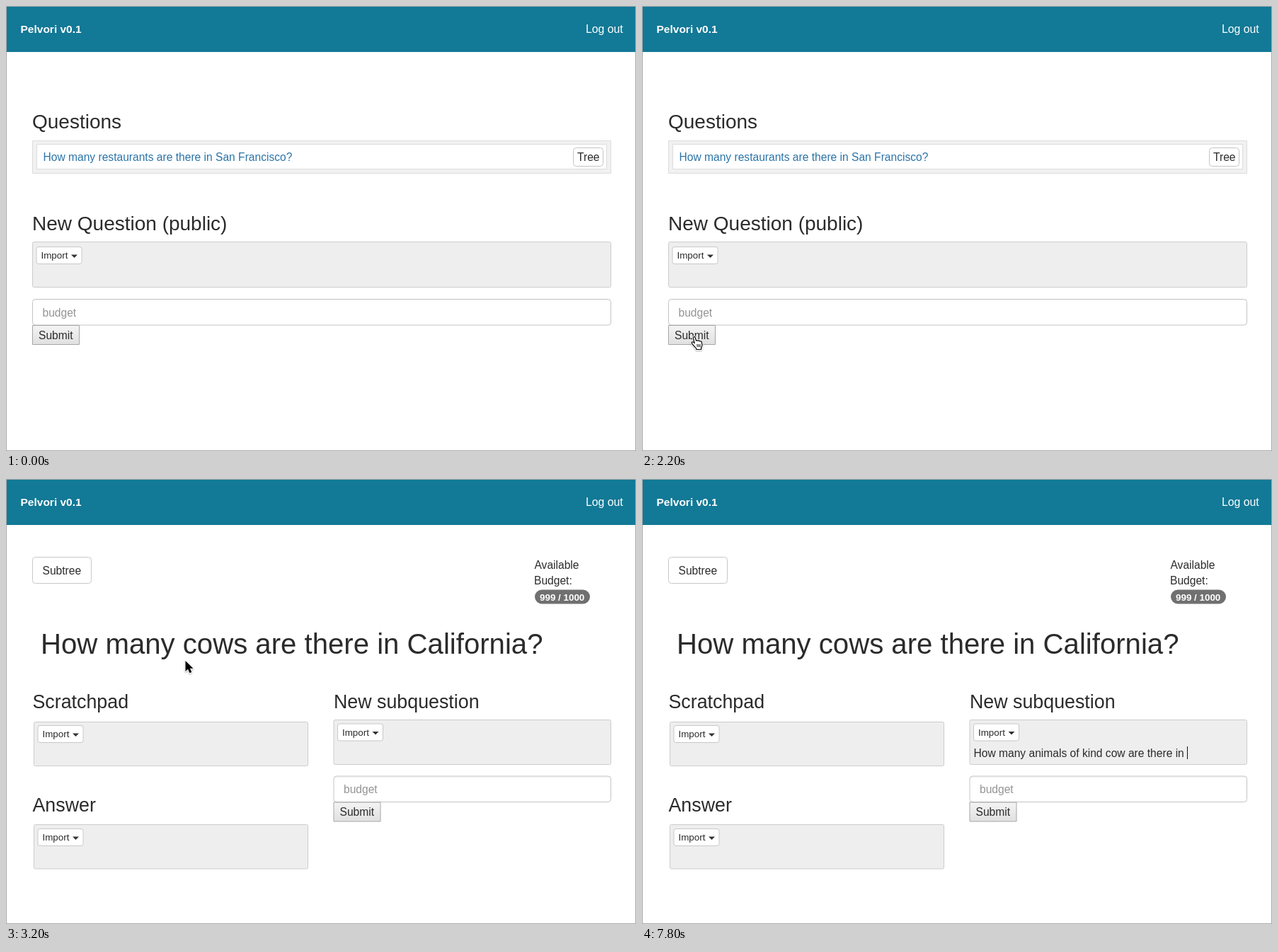
These frames come from a looping animation (890x629 px, 8000 ms). An HTML page with a canvas:

```html
<!DOCTYPE html>
<html lang="en">
<head>
<meta charset="utf-8">
<title>Question board</title>
<style>
html, body { margin: 0; width: 100%; height: 100%; overflow: hidden; background: #fff; }
canvas { display: block; width: 890px; height: 629px; }
</style>
</head>
<body>
<canvas id="stage" width="890" height="629"></canvas>
<script>
const ctx = document.getElementById('stage').getContext('2d');
const LOOP = 8000, TICK = 200;
const SANS = '"Liberation Sans", Arial, sans-serif';
const BODY = 15.6, INK = '#2b2b2b', LINK = '#2a74a8', HOVER = '#0d4858';
const COWS = 'How many cows are there in California?';
const SUBQUESTION = 'How many animals of kind cow are there in ';

// [start time, number of characters typed]
const firstTyping = [[0, 0], [200, 6], [400, 13], [600, 19], [800, 25], [1000, 32], [1200, 38], [2200, 0]];
const secondTyping = [[0, 0], [5400, 3], [5600, 6], [5800, 9], [6200, 11], [6400, 14], [6600, 16],
  [7200, 22], [7400, 29], [7600, 35], [7800, 42]];

// [start time, pointer shape, x, y]
const pointerKeys = [[0], [1600, 'beam', 196, 424], [1800, 'beam', 112, 438], [2000, 'hand', 74, 463],
  [2200, 'hand', 70, 467], [2400, 'beam', 77, 474], [2600, 'arrow', 246, 290], [3000, 'hand', 250, 257],
  [3200, 'arrow', 253.5, 257], [3400, 'arrow', 272, 270], [3600, 'arrow', 350, 311],
  [3800, 'arrow', 440, 362], [4000, 'beam', 492.5, 389], [4200, 'arrow', 625, 611], [5200]];

const latest = (keys, t) => keys.filter(key => key[0] <= t).pop();

function text(str, x, y, size = BODY, color = INK, weight = 400, family = SANS) {
  ctx.font = `${weight} ${size}px ${family}`;
  ctx.fillStyle = color;
  ctx.fillText(str, x, y);
}

function box(x, y, w, h, fill, stroke, radius = 0) {
  ctx.beginPath();
  ctx.roundRect(x, y, w, h, radius);
  ctx.fillStyle = fill;
  ctx.fill();
  if (!stroke) return;
  ctx.strokeStyle = stroke;
  ctx.lineWidth = 1;
  ctx.stroke();
}

function header() {
  box(0, 0, 890, 65, '#127996');
  text('Pelvori v0.1', 20.5, 37.5, 15.5, '#fff', 700);
  text('Log out', 819, 37.5, 15.8, '#fff');
}

function importButton(x, y) {
  box(x, y, 64, 24, '#fff', '#c8c8c8', 3);
  text('Import', x + 6.5, y + 16.5, 13.4);
  ctx.fillStyle = '#333';
  ctx.beginPath();
  ctx.moveTo(x + 49, y + 11);
  ctx.lineTo(x + 58, y + 11);
  ctx.lineTo(x + 53.5, y + 15.5);
  ctx.fill();
}

function editor(x, y, w, h, buttonGap) {
  box(x, y, w, h, '#eee', '#ccc', 2);
  importButton(x + 5.5, y + buttonGap);
}

function budgetForm(x, y, w) {
  box(x, y, w, 36.5, '#fff', '#c4c4c4', 4);
  box(x + 2, y + 1, w - 4, 1, 'rgba(0,0,0,.06)');
  text('budget', x + 14, y + 24, BODY, '#949494');
  const shade = ctx.createLinearGradient(0, y + 37, 0, y + 64);
  shade.addColorStop(0, '#f4f4f4');
  shade.addColorStop(1, '#e0e0e0');
  box(x, y + 37, 66, 27, shade, '#a6a6a6');
  text('Submit', x + 8.5, y + 56);
}

function typed(str, count, x, y, showCaret) {
  const part = str.slice(0, count);
  text(part, x, y);
  if (showCaret) box(Math.round(x + ctx.measureText(part).width), y - 14.5, 1, 18, '#111');
}

function questionRow(str, y, buttonY, color) {
  box(43.5, y, 805, 35, '#fff', '#ddd');
  text(str, 52.5, y + 23.5, BODY, color);
  box(801.5, buttonY, 42, 26, '#fff', '#c4c4c4', 4);
  text('Tree', 807, buttonY + 18.5);
}

function statusBar() {
  box(-1, 616.5, 297, 20, '#e9e9e9', '#a8a8a8', [0, 4, 0, 0]);
  text('trialhost:4100/.../bc07e29f-6da1-48b5-c937-2', 2, 631, 12.6, '#222', 400, 'Inter, sans-serif');
}

function listPage(t) {
  const added = t >= 2400, hovering = t >= 3000;
  const shift = added ? 39 : 0, gap = added ? 40 : 0;
  text('Questions', 37, 173, 28);
  box(37.5, 190.5, 817, 46 + gap, '#f1f1f1', '#ddd');
  questionRow('How many restaurants are there in San Francisco?', 195.5, 200.5, LINK);
  if (added) questionRow(COWS, 235.5, 239.5, hovering ? HOVER : LINK);
  text('New Question (public)', 37, 316.5 + gap, 28);
  editor(37.5, 333.5 + gap, 817, 64 - (gap - shift), added ? 6 : 7);
  if (t >= 200) typed(COWS, latest(firstTyping, t)[1], 43, 387 + shift, t < 2200);
  budgetForm(37.5, 414.5 + shift, 817);
  if (hovering) statusBar();
}

function questionPage(t) {
  box(37.5, 110.5, 83, 37, '#fff', '#c8c8c8', 4);
  text('Subtree', 51.5, 134.5);
  text('Available', 746.5, 126.5);
  text('Budget:', 746, 148.5);
  box(747, 156.5, 78, 20, '#707070', null, 10);
  text('999 / 1000', 754, 171.5, 13.4, '#fff', 700);
  text(COWS, 49, 247, 40.15);

  text('Scratchpad', 37.5, 323.5, 26.8);
  editor(39.5, 343.5, 387, 62, 5);
  text('Answer', 37.5, 469.5, 26.8);
  editor(39.5, 488.5, 387, 62.5, 6);

  text('New subquestion', 463, 323.5, 26.8);
  editor(463, 340.5, 391.5, 63, 5.5);
  const caretOn = t >= 5200 && (t < 6600 || t >= 7200);
  typed(SUBQUESTION, latest(secondTyping, t)[1], 468.5, 392.5, caretOn);
  budgetForm(463, 420, 391.5);
}

const shapes = {
  arrow: new Path2D('M0 0V15L3.5 11.8L6 17.3L8.8 16.1L6.4 10.8H11Z'),
  hand: new Path2D('M2.2 2Q3.3 -.6 5 1.2L6.6 6.2Q8 4.8 9 6.3Q10.6 5.2 11.6 7Q13.6 6.2 14.3 8.2L15 12' +
    'Q15 14.4 13.6 16V18.5H7L6.4 16.6Q3.4 14 .8 10.4Q-.4 8.4 1 7.8Q2.6 7.5 4.2 9.6Z'),
  knuckles: new Path2D('M7.8 11L8.3 15M9.9 11L10.3 15M12 11L12.2 15'),
  beam: new Path2D('M-3 -7.5Q0 -7.5 0 -5.5Q0 -7.5 3 -7.5M0 -5.5V5.5M-3 7.5Q0 7.5 0 5.5Q0 7.5 3 7.5')
};

function outline(path, color, width) {
  ctx.strokeStyle = color;
  ctx.lineWidth = width;
  ctx.stroke(path);
}

function pointer(t) {
  const [, kind, x, y] = latest(pointerKeys, t);
  if (!kind) return;
  ctx.save();
  ctx.translate(x, y);
  ctx.lineJoin = 'round';
  if (kind === 'beam') {
    outline(shapes.beam, '#222', 1);
  } else {
    const isArrow = kind === 'arrow';
    ctx.shadowColor = 'rgba(0,0,0,.3)';
    ctx.shadowBlur = 2;
    ctx.shadowOffsetY = 1;
    outline(shapes[kind], '#fff', isArrow ? 2 : 3);
    ctx.shadowColor = 'transparent';
    ctx.fillStyle = isArrow ? '#000' : '#fff';
    ctx.fill(shapes[kind]);
    if (!isArrow) {
      outline(shapes.hand, '#000', 1.2);
      outline(shapes.knuckles, '#000', 0.9);
    }
  }
  ctx.restore();
}

function draw(time) {
  const t = Math.floor(time % LOOP / TICK) * TICK;
  box(0, 0, 890, 629, '#fff');
  header();
  (t < 3200 ? listPage : questionPage)(t);
  ctx.strokeStyle = '#a9a9a9';
  ctx.lineWidth = 1;
  ctx.strokeRect(0.5, 0.5, 889, 628);
  pointer(t);
}

let start;
function frame(now) {
  start ??= now;
  draw(now - start);
  requestAnimationFrame(frame);
}
draw(0);
requestAnimationFrame(frame);
</script>
</body>
</html>
```
